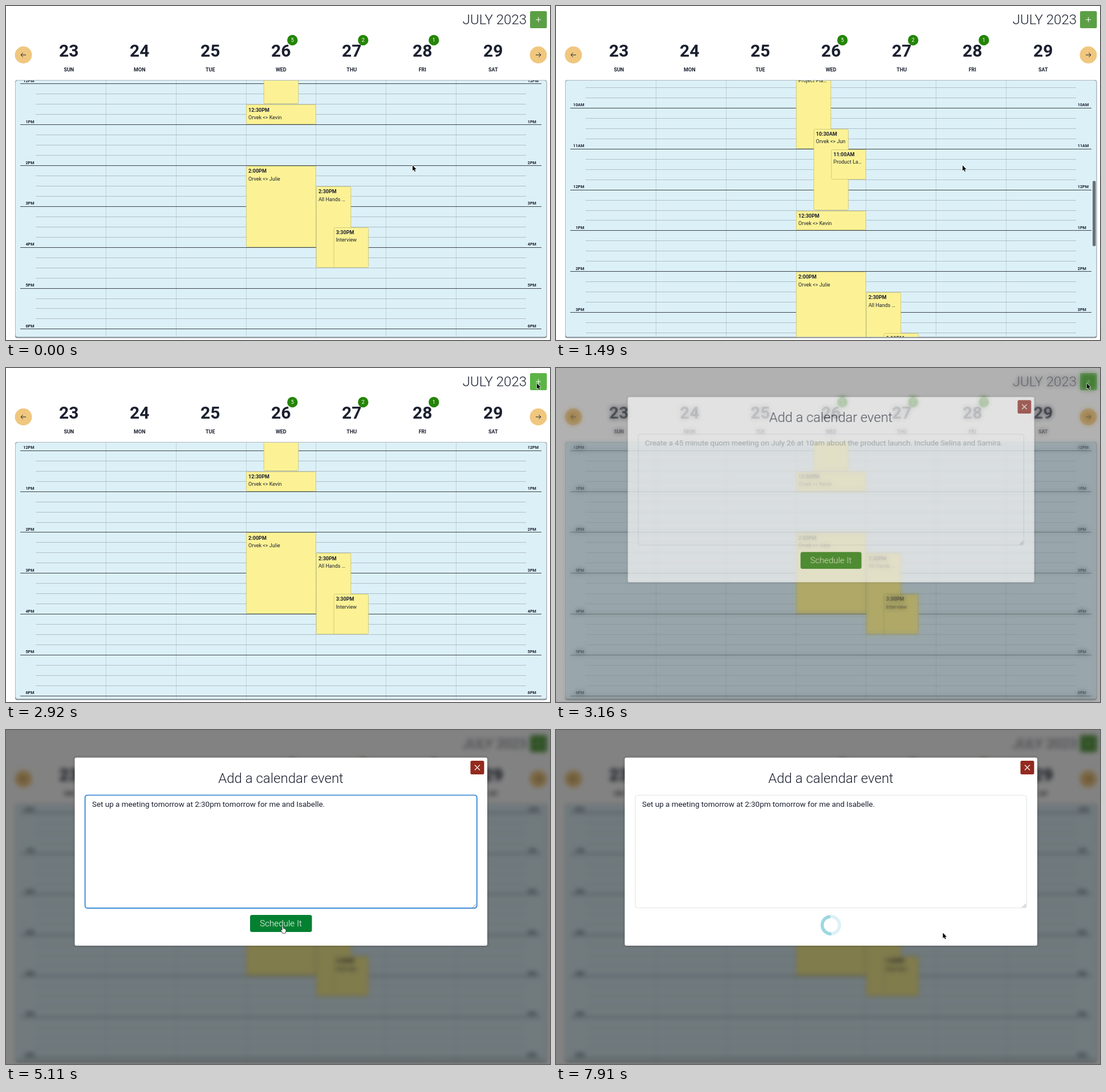
These frames come from a looping animation (954 by 587 pixels, 8 s). An HTML page with a canvas:

```html
<!DOCTYPE html>
<html lang="en">
<head>
<meta charset="utf-8">
<title>Calendar</title>
<style>
  html, body { margin: 0; width: 100%; height: 100%; overflow: hidden; background: #fff; }
  canvas { display: block; width: 954px; height: 587px; }
</style>
</head>
<body>
<canvas id="stage"></canvas>
<script>
const W = 954, H = 587, LOOP = 8000;
const dpr = window.devicePixelRatio || 1;
const INK = '#1b2030';

function setup(canvas) {
  canvas.width = W * dpr;
  canvas.height = H * dpr;
  const c = canvas.getContext('2d');
  c.scale(dpr, dpr);
  return c;
}
const stage = document.getElementById('stage');
const ctx = setup(stage);
const sheet = document.createElement('canvas');
const sheetCtx = setup(sheet);

// Timeline in ms
const PRESS_ADD = 2950, OPENED = 3310, PASTE = 4450, WAKE = 4750;
const OVER_BUTTON = 5020, SUBMIT = 5470;

// Smooth step from 0 at time a to 1 at time b
function ease(t, a, b) {
  const u = Math.min(1, Math.max(0, (t - a) / (b - a)));
  return u * u * (3 - 2 * u);
}
const noonY = t => 136.9 + 318 * ease(t, 740, 1200) - 309.6 * ease(t, 1260, 1773);
const barAlpha = t => ease(t, 700, 800) - ease(t, 2200, 2450);
const openness = t => ease(t, PRESS_ADD, OPENED);
const focusing = t => ease(t, 3550, 3950) - ease(t, 5300, 5690);

// Pointer strokes: start, end, destination
const strokes = [
  [1790, 2300, 931, 27],
  [3160, OPENED, 545, 147],
  [WAKE, 5110, 485, 345],
  [6130, 6730, 678.5, 356.5]
];
function pointerAt(t) {
  let x = 713, y = 280;
  for (const [from, to, tx, ty] of strokes) {
    const k = ease(t, from, to);
    x += (tx - x) * k;
    y += (ty - y) * k;
  }
  return [x, y];
}

function text(c, s, x, y, font, color = INK, align = 'left') {
  c.font = font + ' Roboto, sans-serif';
  c.fillStyle = color;
  c.textAlign = align;
  c.fillText(s, x, y);
}
function box(c, x, y, w, h, r, fill, stroke, line = 1) {
  c.beginPath();
  c.roundRect(x, y, w, h, r);
  if (fill) { c.fillStyle = fill; c.fill(); }
  if (stroke) { c.strokeStyle = stroke; c.lineWidth = line; c.stroke(); }
}
function disc(c, x, y, r, color) {
  c.beginPath();
  c.arc(x, y, r, 0, 7);
  c.fillStyle = color;
  c.fill();
}
function lines(c, color, width, ...paths) {
  c.strokeStyle = color;
  c.lineWidth = width;
  c.beginPath();
  for (const [x, y, ...rest] of paths) {
    c.moveTo(x, y);
    for (let i = 0; i < rest.length; i += 2) c.lineTo(rest[i], rest[i + 1]);
  }
  c.stroke();
}

const HOUR = 71.83, LEFT = 52, COL = 860 / 7;
const days = ['SUN', 'MON', 'TUE', 'WED', 'THU', 'FRI', 'SAT'];
const counts = { WED: 5, THU: 2, FRI: 1 };
const events = [
  { day: 3, left: 0, width: 0.5, from: 9, to: 11, title: 'Project Pla…' },
  { day: 3, left: 0.25, width: 0.5, from: 10.5, to: 12.5, title: 'Orvek <> Jun' },
  { day: 3, left: 0.5, width: 0.5, from: 11, to: 11.75, title: 'Product La…' },
  { day: 3, left: 0, width: 1, from: 12.5, to: 13, title: 'Orvek <> Kevin' },
  { day: 3, left: 0, width: 1, from: 14, to: 16, title: 'Orvek <> Julie' },
  { day: 4, left: 0, width: 0.5, from: 14.5, to: 16.5, title: 'All Hands …' },
  { day: 4, left: 0.25, width: 0.5, from: 15.5, to: 16.5, title: 'Interview' }
];

function clock(hour, minutes = '') {
  return (Math.floor(hour) % 12 || 12) + minutes + (hour % 24 < 12 ? 'AM' : 'PM');
}

function drawHeader(c, hover) {
  text(c, 'JULY 2023', 913, 32.3, '300 24px', INK, 'right');
  box(c, 919, 9, 29.5, 30, 2.5, hover ? '#5cb447' : '#5b9f45');
  lines(c, '#fff', 1, [929.3, 24, 938, 24], [933.7, 19.6, 933.7, 28.4]);

  days.forEach((name, i) => {
    const x = 110.3 + 124 * i;
    text(c, 23 + i, x, 89, '700 30px', INK, 'center');
    text(c, name, x, 114.5, '700 9px', INK, 'center');
    if (counts[name]) {
      disc(c, x + 20, 60, 9.2, '#248505');
      text(c, counts[name], x + 20, 63.3, '400 9px', '#fff', 'center');
    }
  });

  for (const [x, dir] of [[30.5, -1], [933.5, 1]]) {
    disc(c, x, 86, 15, '#f0c77f');
    lines(c, INK, 1, [x - 4.5 * dir, 86, x + 4.5 * dir, 86],
      [x + dir * 0.8, 82.2, x + 4.5 * dir, 86, x + dir * 0.8, 89.8]);
  }
}

function drawGrid(c, t) {
  const noon = noonY(t);
  const yAt = hour => noon + (hour - 12) * HOUR;

  box(c, 16, 130, 932.5, 453.5, 4, '#6f7a80');
  box(c, 16.5, 130.5, 931.5, 451.3, 4, '#dcf0f7', '#aab7bc');
  c.save();
  c.beginPath();
  c.rect(17, 131, 931, 450.5);
  c.clip();

  for (let hour = 0; hour <= 24; hour += 0.25) {
    const y = yAt(hour), whole = hour % 1 === 0;
    c.fillStyle = whole ? '#3c4449' : 'rgba(0,0,0,.2)';
    c.fillRect(whole ? 25 : LEFT, Math.floor(y), whole ? 914 : 860, 1);
    if (whole) {
      text(c, clock(hour), 49.5, y - 3, '700 7.2px', INK, 'right');
      text(c, clock(hour), 914.8, y - 3, '700 7.2px');
    }
  }
  c.fillStyle = 'rgba(0,0,0,.12)';
  for (let i = 1; i < 7; i++) c.fillRect(Math.round(LEFT + COL * i), 131, 1, 451);

  for (const { day, left, width, from, to, title } of events) {
    const x = LEFT + COL * (day + left) + 0.9;
    const top = Math.floor(yAt(from)) + 1.5, bottom = Math.floor(yAt(to)) - 0.5;
    box(c, x, top, COL * width - 1, bottom - top, 2, '#fcf295', '#cfc77a', 0.9);
    text(c, clock(from, from % 1 ? ':30' : ':00'), x + 3.6, yAt(from) + 12.7, '700 9px');
    text(c, title, x + 3.6, yAt(from) + 26.1, '400 9px');
  }

  c.globalAlpha = barAlpha(t);
  box(c, 941, 391.2 - noon * 0.26, 5.5, 115, 2.8, '#687278');
  c.restore();
}

function drawSpinner(c, t) {
  const a = 1.5 + (t - 7910) * Math.PI / 500;
  c.lineWidth = 5.6;
  for (const [start, color] of [[a, '#9cd8e1'], [a + Math.PI, '#dcf0f7']]) {
    c.strokeStyle = color;
    c.beginPath();
    c.arc(482, 343, 15.2, start, start + Math.PI);
    c.stroke();
  }
}

function drawSheet(c, t) {
  const focus = focusing(t);
  c.clearRect(0, 0, W, H);
  c.save();
  c.shadowColor = 'rgba(0,0,0,.25)';
  c.shadowBlur = 5 * dpr;
  box(c, 120.5, 48.5, 723.5, 330.5, 3, '#fff');
  c.restore();

  text(c, 'Add a calendar event', 482, 92.5, '300 24px', INK, 'center');
  box(c, 814.5, 54, 24, 24, 2.5, '#932a1f');
  lines(c, '#fff', 1.1, [822, 61.5, 831, 70.5], [831, 61.5, 822, 70.5]);

  box(c, 139, 114.7, 686.5, 198, 4, '#fff', '#e1e3e5');
  c.globalAlpha = focus;
  box(c, 138.6, 114.5, 687.2, 198.6, 4, null, '#2a7fd0', 1.7);
  c.globalAlpha = 1;
  lines(c, '#777', 0.8, [818, 312, 824.5, 305.5], [821.5, 312, 824.5, 309]);

  const font = '400 13.45px';
  if (t >= PASTE) {
    text(c, 'Set up a meeting tomorrow at 2:30pm tomorrow for me and Isabelle.', 151, 134.8, font);
  } else {
    c.globalAlpha = 1 - focus;
    text(c, 'Create a 45 minute quom meeting on July 26 at 10am about the product launch. ' +
      'Include Selina and Samira.', 151, 134.8, font, '#a3a8ad');
    c.globalAlpha = focus;
    lines(c, INK, 1, [151.5, 122, 151.5, 138]);
    c.globalAlpha = 1;
  }

  if (t < SUBMIT) {
    box(c, 428, 325, 108.5, 30, 3.5, t >= OVER_BUTTON ? '#048031' : '#167a14');
    text(c, 'Schedule It', 482, 345.2, '300 15.2px', '#fff', 'center');
  } else {
    drawSpinner(c, t);
  }
}

const arrow = new Path2D('M0 0V9.4L2.1 7.5L3.7 11L5.2 10.4L3.7 6.9H6.6Z');
const hand = new Path2D('M-.7 .8Q.2-.6 1.1 .8L1.4 4.4Q4 4 5.4 5.4Q6.2 6.4 5.6 9L4.8 11.8H.4' +
  'L-3 7.2Q-2.9 5.6-1.5 6.5L-.5 7.4Z');

function drawPointer(c, t) {
  if (t >= PASTE && t < WAKE) return;
  c.save();
  c.translate(...pointerAt(t));
  c.lineJoin = 'round';
  if (t >= OPENED && t < OVER_BUTTON) {
    lines(c, '#333', 1, [-2, -7, 0, -6, 2, -7], [0, -6, 0, 6], [-2, 7, 0, 6, 2, 7]);
  } else {
    const pointing = t >= OVER_BUTTON && t < SUBMIT;
    const shape = pointing ? hand : arrow;
    c.strokeStyle = pointing ? '#000' : '#fff';
    c.fillStyle = pointing ? '#fff' : '#000';
    c.lineWidth = 1.2;
    c.stroke(shape);
    c.fill(shape);
  }
  c.restore();
}

function draw(t) {
  const open = openness(t);
  ctx.fillStyle = '#fff';
  ctx.fillRect(0, 0, W, H);
  drawHeader(ctx, t >= 2260 && t < OPENED);
  drawGrid(ctx, t);

  if (open > 0) {
    ctx.save();
    ctx.globalAlpha = open;
    ctx.filter = `blur(${4 * dpr}px)`;
    ctx.drawImage(stage, 0, 0, W, H);
    ctx.filter = 'none';
    ctx.fillStyle = 'rgba(0,0,0,.49)';
    ctx.fillRect(0, 0, W, H);

    drawSheet(sheetCtx, t);
    const s = 0.96 + 0.04 * open;
    ctx.translate(482, 214);
    ctx.scale(s, s);
    ctx.drawImage(sheet, -482, -214, W, H);
    ctx.restore();
  }
  drawPointer(ctx, t);
}

const begin = performance.now();
function frame() {
  draw((performance.now() - begin) % LOOP);
  requestAnimationFrame(frame);
}
frame();
</script>
</body>
</html>
```
